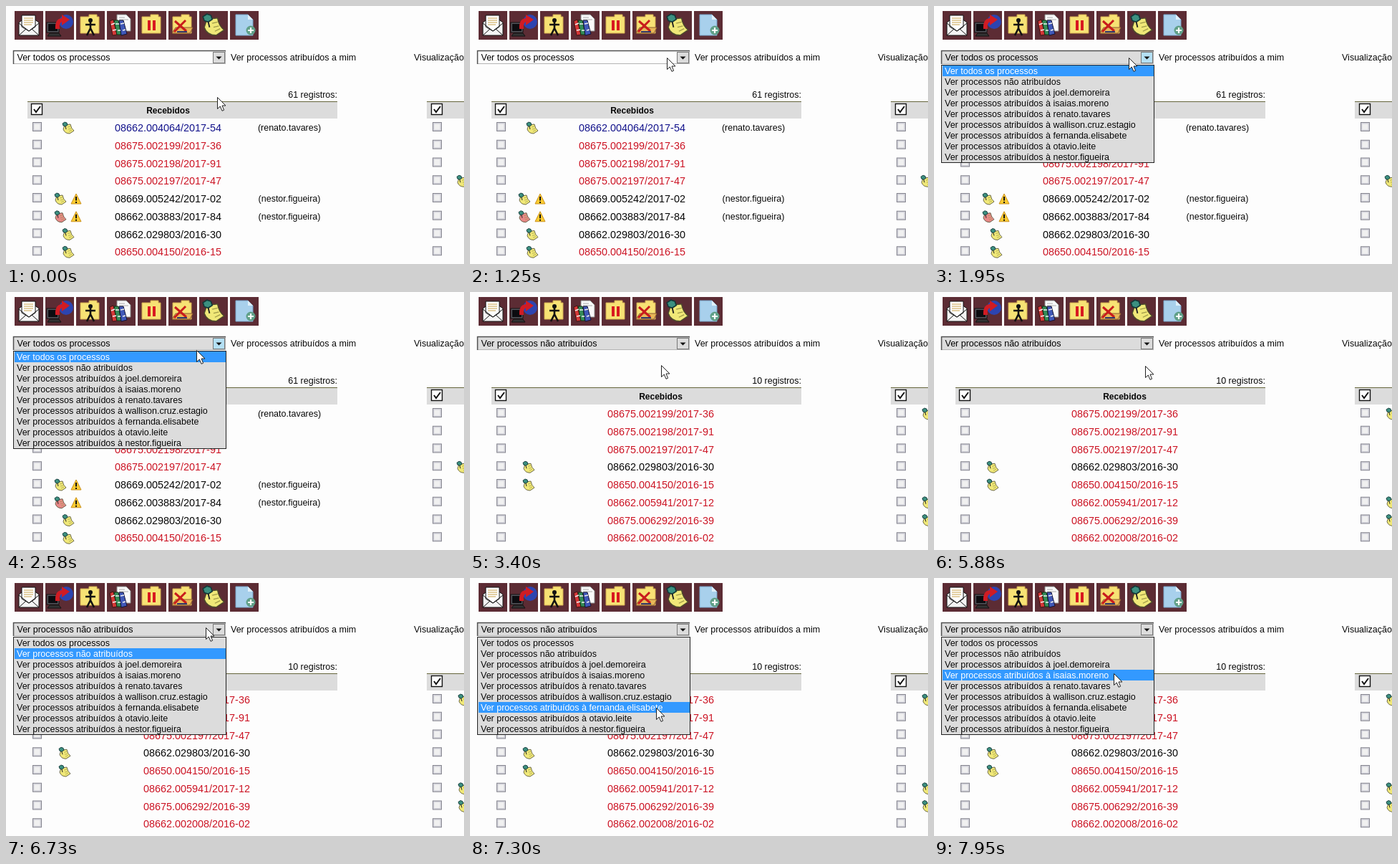
An HTML page that plays this animation: 640 px wide and 360 px high, repeating every 8000 ms.

```html
<!DOCTYPE html>
<html lang="pt-BR">
<head>
<meta charset="utf-8">
<style>
  html, body { margin: 0; width: 100%; height: 100%; overflow: hidden; background: #fdfdfd; }
  svg { display: block; width: 640px; height: 360px; font: 12.5px "Liberation Sans", Arial, sans-serif; }
  .number { font-size: 14.4px; text-anchor: middle; }
  .middle { text-anchor: middle; }
  .end { text-anchor: end; }
  .heading { font-size: 12px; font-weight: bold; text-anchor: middle; }
</style>
</head>
<body>
<svg id="stage" viewBox="0 0 640 360"></svg>
<script>
const LOOP = 8000;
const RED = '#cc1424', BLUE = '#14148c', BLACK = '#080808';
const PAGE = '#fdfdfd', GRAY = '#dcdcdc';

const options = [
  'Ver todos os processos',
  'Ver processos não atribuídos',
  ...['joel.demoreira', 'isaias.moreno', 'renato.tavares', 'wallison.cruz.estagio',
    'fernanda.elisabete', 'otavio.leite', 'nestor.figueira'].map(user => 'Ver processos atribuídos à ' + user)
];

const views = [
  {
    count: 61, center: 226.5, noteX: 87, otherNotes: [[638, 3]],
    rows: [
      { id: '08662.004064/2017-54', color: BLUE, icons: 'n', user: 'renato.tavares' },
      { id: '08675.002199/2017-36', color: RED },
      { id: '08675.002198/2017-91', color: RED },
      { id: '08675.002197/2017-47', color: RED },
      { id: '08669.005242/2017-02', color: BLACK, icons: 'nw', user: 'nestor.figueira' },
      { id: '08662.003883/2017-84', color: BLACK, icons: 'rw', user: 'nestor.figueira' },
      { id: '08662.029803/2016-30', color: BLACK, icons: 'n' },
      { id: '08650.004150/2016-15', color: RED, icons: 'n' }
    ]
  },
  {
    count: 10, center: 266.5, noteX: 82, otherNotes: [[640, 0], [640, 5], [640, 6]],
    rows: [
      { id: '08675.002199/2017-36', color: RED },
      { id: '08675.002198/2017-91', color: RED },
      { id: '08675.002197/2017-47', color: RED },
      { id: '08662.029803/2016-30', color: BLACK, icons: 'n' },
      { id: '08650.004150/2016-15', color: RED, icons: 'n' },
      { id: '08662.005941/2017-12', color: RED },
      { id: '08675.006292/2016-39', color: RED },
      { id: '08662.002008/2016-02', color: RED }
    ]
  }
];

// Pointer stops: time, x, y
const stops = [
  [0, 295, 127], [100, 295, 127], [1250, 275, 72], [1600, 275, 72], [1700, 272, 72],
  [1900, 272, 72], [2580, 266, 81], [2900, 262, 101], [3300, 262, 101], [4130, 384, 136],
  [4700, 405, 128], [5200, 405, 128], [5880, 295, 103], [6450, 279, 69], [6750, 279, 69],
  [7450, 258, 196], [7950, 251, 133], [LOOP, 251, 133]
];

const rowY = i => 170 + i * 24.75;
const path = (d, fill, extra = '') => `<path d="${d}" fill="${fill}" ${extra}/>`;
const rect = (x, y, w, h, fill, extra = '') =>
  `<rect x="${x}" y="${y}" width="${w}" height="${h}" fill="${fill}" ${extra}/>`;
const text = (x, y, value, cls = '', fill = BLACK) =>
  `<text x="${x}" y="${y}" class="${cls}" fill="${fill}">${value}</text>`;
const at = (x, y, body, scale = 1) => `<g transform="translate(${x} ${y}) scale(${scale})">${body}</g>`;
const line = (color, width = 1) => `stroke="${color}" stroke-width="${width}"`;

const note = (x, y, paper = '#f0e878', scale = 1) => at(x, y,
  path('M-5-4L3-5Q4 1 8 4L2 8Q-5 8-7 2Z', paper, line('#4c4a2c', .8)) +
  path('M-1-1L3-2M0 2L4 1M1 5L5 3', 'none', line('#a09a48', .7)) +
  path('M-8-6l3-2 3 1 1 3-3 2-3-1Z', '#3c9080', line('#123838', .9)) +
  path('M-4-2l1 4', 'none', line('#222')), scale);

const warning = (x, y) => at(x, y,
  path('M0-7L7 7H-7Z', '#ffcc30', line('#c8901c') + ' stroke-linejoin="round"') +
  rect(-1, -3, 2, 5.5, '#111') + rect(-1, 4, 2, 2, '#111'));

const checkbox = (x, y) => rect(x - 5.5, y - 7.5, 12, 12, '#d2d2da', line('#85858f')) +
  rect(x - 3.5, y - 5.5, 8, 8, '#f0f0f0');

const checkAll = x => rect(x - 7.5, 136.5, 15, 15, '#fff', line('#111', 1.4)) +
  path(`M${x - 4} 144l3 4 6-8`, 'none', line('#111', 2));

const header = (x, w) => rect(x, 133, w, 24, GRAY) + rect(x, 133, w, 1, '#65653c');

const folder = path('M6 31V8H18V5H29V8H32V31Z', '#f7e274', line('#d0a850'));

const toolbar = [
  // Open letter
  path('M6 16L20 6 34 16V34H6Z', '#f4f4f4', line('#111')) +
  path('M10 6H29V22L20 28 10 22Z', '#fff', line('#111')) +
  path('M13 10H26M13 13H26M13 16H26M13 19H24', 'none', line('#c8a048')) +
  path('M6 17L20 28 34 17M6 34L16 25M34 34L24 25', 'none', line('#111')),
  // Computer, globe and arrow
  '<circle cx="29" cy="15" r="10" fill="#2c44b0"/>' +
  rect(2, 16, 17, 14, '#55555c', line('#111')) + rect(4, 18, 13, 10, '#0c0c10') +
  path('M3 35l3-4H19l3 4Z', '#333', line('#111')) +
  path('M14 25Q13 11 23 10V5l11 7-11 8V15Q19 17 20 25Z', '#d01c24'),
  // Folder with a person
  folder + '<circle cx="20" cy="13" r="3" fill="#111"/>' +
  path('M20 15V25M13 19H27M20 24L15 34M20 24L25 34', 'none', line('#111', 2.6)),
  // Books
  path('M14 5H27l6 6V28H14Z', '#fafafa', line('#888')) +
  path('M17 9H25M17 12H30', 'none', line('#aaa')) +
  path('M4 14L9 12 14 33 8 34Z', '#d43838', line('#411')) +
  path('M10 13H16L20 33H14Z', '#348c58', line('#131')) +
  path('M17 13H23L28 32 20 34Z', '#4058b8', line('#113')) +
  path('M6 19L11 17M12 18H17M19 18L24 17M8 27L13 26M15 27H19M22 27L26 26', 'none', line('#eee', 1.5)),
  // Paused folder
  folder + rect(14, 13, 4, 14, '#d81820') + rect(21, 13, 4, 14, '#d81820'),
  // Folder with a cross
  folder + path('M5 31L10 23H34L30 31Z', '#e8b858', line('#8c5c30')) +
  path('M9 14L25 28M24 13L8 29', 'none', line('#c81c1c', 3)) +
  path('M12 29H26', 'none', line('#30386c', 2)),
  // Pinned note
  note(20, 19, '#f0e878', 1.85),
  // New document
  path('M8 5H25l7 7V34H8Z', '#a8d0ec', line('#78a4c8')) + path('M25 5V12H32Z', '#e0f0fa') +
  '<circle cx="29" cy="27" r="6.5" fill="#60a088"/>' + path('M29 23V31M25 27H33', 'none', line('#fff', 2.2))
];

const rowIcons = (kinds, y, x) => [...kinds].map((kind, i) => {
  const iconX = kinds.length > 1 ? x - 11 + i * 22 : x;
  return kind === 'w' ? warning(iconX, y) : note(iconX, y, kind === 'r' ? '#e88888' : undefined);
}).join('');

const drawView = ({ count, center, noteX, otherNotes, rows }) => '<g>' +
  text(463, 128, count + ' registros:', 'end') + text(center, 150, 'Recebidos', 'heading') +
  rows.map((row, i) => {
    const y = rowY(i);
    return text(center, y + 5, row.id, 'number', row.color) + rowIcons(row.icons || '', y, noteX) +
      (row.user ? text(396, y + 4, `(${row.user})`, 'middle') : '');
  }).join('') +
  otherNotes.map(([x, row]) => note(x, rowY(row))).join('') + '</g>';

const stage = document.getElementById('stage');
stage.innerHTML = rect(0, 0, 640, 360, PAGE) +
  toolbar.map((icon, i) => at(12 + i * 43, 7, rect(0, 0, 40, 40, '#5c2c34') + icon)).join('') +
  text(314, 76, 'Ver processos atribuídos a mim') + text(570, 76, 'Visualização') +
  header(30, 433) + header(588, 52) + checkAll(43) + checkAll(602) +
  views[0].rows.map((_, i) => checkbox(43, rowY(i)) + checkbox(602, rowY(i))).join('') +
  `<g id="views">${views.map(drawView).join('')}</g>` +
  rect(10.5, 62.5, 296, 18, PAGE, line('#b4b4b4') + ' id="field"') +
  path('M10.5 81V62.5H307', 'none', line('#505050', 1.5)) +
  '<text id="choice" x="15.5" y="76"></text>' +
  rect(289.5, 64.5, 16, 15, GRAY, line('#777') + ' id="button"') + path('M293.5 70.5H301.5L297.5 74.5Z', '#111') +
  '<g id="menu">' + rect(10.5, 82.5, 297, 136, GRAY, line('#222')) +
  rect(12, 0, 295, 15, '#3399ff', 'id="highlight"') +
  options.map((option, i) => text(15, 94.5 + i * 15.05, option)).join('') + '</g>' +
  '<g id="pointer">' +
  path('M.5.5V16.5L4.3 13 7 19.3 9.6 18.2 7 12H12Z', '#fff', line('#222')) + '</g>';

const [viewGroup, field, choice, button, menu, highlight, pointer] =
  ['views', 'field', 'choice', 'button', 'menu', 'highlight', 'pointer'].map(id => document.getElementById(id));
const labels = menu.querySelectorAll('text');
const show = (element, visible) => element.setAttribute('display', visible ? 'inline' : 'none');

function pointerAt(time) {
  const next = stops.findIndex(stop => stop[0] > time);
  const [t0, x0, y0] = stops[next - 1], [t1, x1, y1] = stops[next];
  const p = (time - t0) / (t1 - t0), eased = p * p * (3 - 2 * p);
  return [x0 + (x1 - x0) * eased, y0 + (y1 - y0) * eased].map(Math.round);
}

function draw(time) {
  const [x, y] = pointerAt(time);
  const selected = time < 2950 ? 0 : 1;
  const firstOpen = time >= 1950 && time < 2950;
  const active = y >= 83 && y < 218 ? Math.floor((y - 83) / 15) : selected;

  [...viewGroup.children].forEach((view, i) => show(view, i === (time < 3300 ? 0 : 1)));
  field.setAttribute('fill', time < 1950 ? PAGE : GRAY);
  button.setAttribute('fill', firstOpen ? '#b4e0f4' : GRAY);
  choice.textContent = options[selected];
  show(menu, firstOpen || time >= 6550);
  highlight.setAttribute('y', 83 + active * 15);
  labels.forEach((label, i) => label.setAttribute('fill', i === active ? '#fff' : BLACK));
  pointer.setAttribute('transform', `translate(${x} ${y})`);
}

function tick() {
  draw(performance.now() % LOOP);
  requestAnimationFrame(tick);
}
tick();
</script>
</body>
</html>
```
